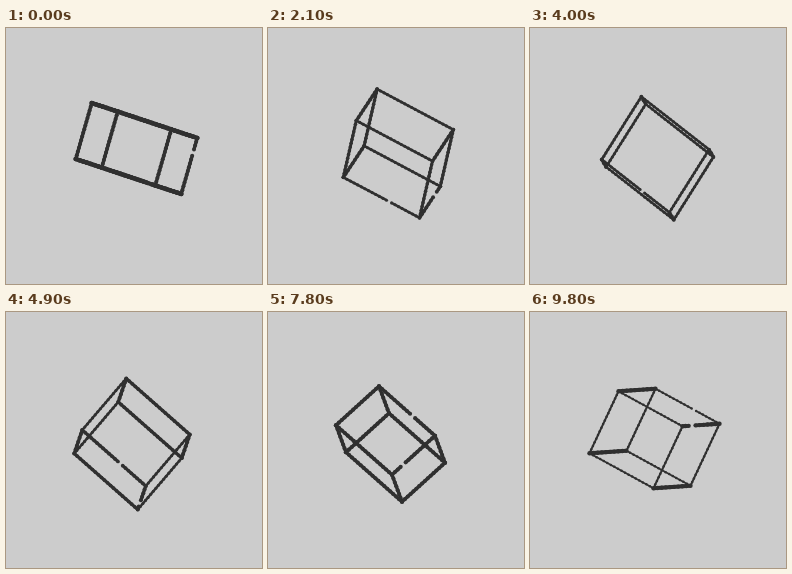
An HTML page with a canvas that plays this animation: 256 px wide and 256 px high, repeating every 10 s.

```html
<!DOCTYPE html>
<html lang="en">
<head>
<meta charset="utf-8">
<title>Turning wireframe</title>
<style>
  html, body { margin: 0; width: 100%; height: 100%; overflow: hidden; background: #ccc; }
  canvas { display: block; width: 256px; height: 256px; }
</style>
</head>
<body>
<canvas id="stage" width="256" height="256"></canvas>
<script>
const ctx = document.getElementById('stage').getContext('2d');
const LOOP = 10000, TICK = 100;

// step, centre x y, edge vectors a b c, line widths a b c
const KEYS = [
  [0,  130.5, 120.5,  26, 8.5,    79.5, 26.5, -16, 56,     4.6, 4.6, 4],
  [11, 131, 123,      5.5, 39,    79, 33,     -22, 48,     4, 4, 4],
  [29, 129, 128,     -29.5, 65.5, 72, 48,     -14.5, 10.5, 3.2, 2.5, 3.6],
  [45, 126, 132,     -44, 51.5,   63.5, 56,   8, -23.5,    3.1, 3.7, 4],
  [58, 123.5, 133,   -34.5, 15,   58.5, 56,   29.5, -41,   3.6, 4.1, 3.6],
  [71, 122.5, 132,   -10, -27,    56, 49.5,   43, -39,     4.1, 4.1, 4.1],
  [90, 124.5, 126.5,  29, -62,    64, 35,     37, -2.5,    2.5, 2.5, 4.4]
];

// Cubic through the four nearest keys
function poseAt(step) {
  let i = KEYS.findIndex(k => k[0] > step);
  if (i < 0) i = KEYS.length - 1;
  const first = Math.max(0, Math.min(KEYS.length - 4, i - 2));
  const near = KEYS.slice(first, first + 4);
  const weights = near.map(p => near.reduce(
    (w, q) => p === q ? w : w * (step - q[0]) / (p[0] - q[0]), 1));
  return near[0].map((_, n) => near.reduce((sum, k, j) => sum + k[n] * weights[j], 0));
}

function beadedLine(x, y, dx, dy, from, to, width) {
  ctx.lineWidth = Math.max(1.5, width - 0.6);
  ctx.beginPath();
  ctx.moveTo(x + dx * from, y + dy * from);
  ctx.lineTo(x + dx * to, y + dy * to);
  ctx.stroke();
  const count = Math.max(1, Math.round(Math.hypot(dx, dy) * (to - from) / 4));
  for (let i = 0; i <= count; i++) {
    const t = from + (to - from) * i / count;
    ctx.beginPath();
    ctx.arc(x + dx * t, y + dy * t, width / 2, 0, Math.PI * 2);
    ctx.fill();
  }
}

function edge(x, y, [dx, dy], width, gap) {
  if (gap === undefined) return beadedLine(x, y, dx, dy, 0, 1, width);
  const half = Math.min(0.15, (width / 2 + 1.3) / Math.hypot(dx, dy));
  beadedLine(x, y, dx, dy, 0, gap - half, width);
  beadedLine(x, y, dx, dy, gap + half, 1, width);
}

function draw(step) {
  const p = poseAt(step);
  const vec = [[p[3], p[4]], [p[5], p[6]], [p[7], p[8]]];
  ctx.fillStyle = '#ccc';
  ctx.fillRect(0, 0, 256, 256);
  ctx.fillStyle = ctx.strokeStyle = '#303030';
  for (let axis = 0; axis < 3; axis++) {
    const u = vec[(axis + 1) % 3], v = vec[(axis + 2) % 3], e = vec[axis];
    for (const s of [-1, 1]) for (const r of [-1, 1]) {
      const x = p[1] + (s * u[0] + r * v[0] - e[0]) / 2;
      const y = p[2] + (s * u[1] + r * v[1] - e[1]) / 2;
      // one b edge and one c edge are broken
      const gap = s > 0 && r > 0 ? [undefined, 0.6, 0.26][axis] : undefined;
      edge(x, y, e, p[9 + axis], gap);
    }
  }
}

let shown = -1;
function frame() {
  const tick = Math.floor(performance.now() % LOOP / TICK);
  const step = tick - Math.floor(tick / 11); // every eleventh tick holds
  if (step !== shown) draw(shown = step);
  requestAnimationFrame(frame);
}
frame();
</script>
</body>
</html>
```
